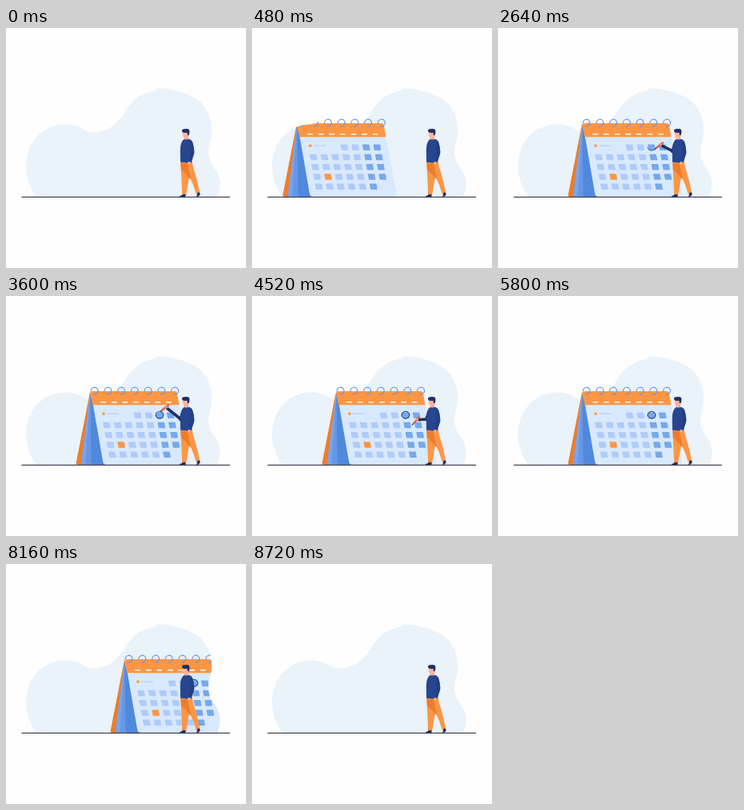
Animation, 300 px wide and 300 px high, one loop 9800 ms. Source, as an HTML page with a canvas:

```html
<!DOCTYPE html>
<html lang="en">
<head>
<meta charset="utf-8">
<title>Marking the date</title>
<style>
html, body { margin: 0; width: 100%; height: 100%; overflow: hidden; background: #fefefe; }
canvas { display: block; width: 100vw; height: 100vh; }
</style>
</head>
<body>
<canvas id="stage"></canvas>
<script>
const LOOP = 9800, STEP = 40;
const canvas = document.getElementById('stage');
const ctx = canvas.getContext('2d');

const color = {
  paper: '#fefefe', blob: '#eaf2fa', ground: '#45454f',
  orange: '#fc9645', rust: '#ee7d2b', sheet: '#d9e9fd',
  sky: '#76a5ee', blue: '#5088dd', day: '#aecbfa', weekend: '#76a8eb',
  ring: '#5b96ee', navy: '#202f63', shirt: '#27468f', skin: '#f8b59b', pen: '#e2633c'
};

const blobLeft = 'M38 211C27 196 23 178 26 163C30 138 49 121 73 120.5';
const blobRight = 'C180 73 216 75 237 88C254 99 260 120 256 138C252 154 252 160 257 170C265 182 272 192 264 211Z';
const blob = new Path2D(blobLeft + 'C94 120 98 131 109 130.5C128 130 140 119 149 105C157 92 167 81 188 78' + blobRight);
// The calendar shows only inside the backdrop, with the dip at the top filled in.
const sceneMask = new Path2D(blobLeft + 'L79 119L90 112L149 100L188 78' + blobRight);

const clamp = u => Math.max(0, Math.min(1, u));
const span = (t, a, b) => clamp((t - a) / (b - a));
const lerp = (a, b, u) => a + (b - a) * u;
const smooth = u => u * u * (3 - 2 * u);

function fill(path, c) {
  ctx.fillStyle = c;
  ctx.fill(typeof path === 'string' ? new Path2D(path) : path);
}

function stroke(path, c, w) {
  ctx.strokeStyle = c;
  ctx.lineWidth = w;
  ctx.stroke(typeof path === 'string' ? new Path2D(path) : path);
}

function oval(x, y, rx, ry, c) {
  const p = new Path2D();
  p.ellipse(x, y, rx, ry, 0, 0, Math.PI * 2);
  fill(p, c);
}

// Hand-drawn loop around the chosen day, traced twice from its left side.
const DRAW_FROM = 2360, DRAW_TO = 3800, LAPS = 2;
function loopPoint(lap) {
  const a = Math.PI * (1 - 2 * lap);
  const r = 1 - 0.04 * lap;
  return [192 + 5 * r * Math.cos(a), 148.7 + 4.5 * r * Math.sin(a)];
}

function drawMark(t) {
  const laps = LAPS * span(t, DRAW_FROM, DRAW_TO);
  if (!laps) return;
  const p = new Path2D();
  for (let i = 0; i <= 60; i++) p.lineTo(...loopPoint(laps * i / 60));
  stroke(p, '#2d4b87', 1);
}

function drawDays() {
  for (let row = 0; row < 5; row++) {
    for (let col = 0; col < 7; col++) {
      if ((row === 0 && col < 3) || (row === 4 && col === 6)) continue;
      const x = 124 + col * 13.65 + row * 2.25, y = 149.2 + row * 12.25;
      const c = row === 3 && col === 1 ? color.orange : col > 4 ? color.weekend : color.day;
      fill(`M${x - 4.6} ${y - 3.7}h7.4q.6 0 .7.6l1.1 6.2q.1.7-.6.7h-7q-.6 0-.8-.6l-1.3-6.2q-.1-.7.5-.7z`, c);
    }
  }
}

function drawCalendar(t) {
  const shift = t < 5800
    ? -225 * Math.pow(1 - span(t, 130, 1010), 3)
    : 185 * Math.pow(span(t, 7820, 8720), 1.5);
  if (t < 130 || t >= 8720) return;
  ctx.save();
  ctx.clip(sceneMask);
  ctx.translate(shift, 0);
  fill('M105 120L87.7 208.5Q87.5 211 90 211H99L109 130Z', color.rust);
  fill('M105.3 121L94 207Q94 211 97 211H124L109 130Z', color.sky);
  fill('M105.5 122L99.5 207Q99.5 211 103 211H124L109 130Z', '#6697e7');
  fill('M105.5 122L106.5 207Q107 211 110 211H125Q122 211 121 206L109 134Z', color.blue);
  fill('M108.5 134H216L229.8 207Q230.4 211 227 211H125.5Q122 211 121.2 207Z', color.sheet);
  fill('M105 122Q105.3 119 108.5 119H211Q213.3 119 213.8 121L216.5 136.3H108.5Z', color.orange);
  for (let i = 0; i < 7; i++) {
    const dash = 118.5 + i * 13.6;
    stroke(`M${dash} 132.7h6.4`, '#fff', 1.5);
    const ring = new Path2D();
    ring.arc(110.6 + i * 16.75, 118.6, 4.4, -Math.PI * 1.05, Math.PI * 0.62);
    stroke(ring, color.ring, 1.2);
  }
  oval(122, 147.1, 1.9, 1.9, color.orange);
  stroke('M126 147.1H141', '#bcd6fa', 1.5);
  drawDays();
  drawMark(t);
  ctx.restore();
}

// Pen tip: time, x, y, angle of the shaft in degrees.
const start = loopPoint(0), end = loopPoint(LAPS);
const penKeys = [
  [960, 224, 172, -90],
  [1120, 215.5, 173, -90],
  [1880, ...start, -38],
  [DRAW_FROM, ...start, -38],
  [DRAW_TO, ...end, -38],
  [4520, 200, 161.5, -48],
  [5320, 214, 172, -80],
  [5800, 224, 172, -90]
];

function penPose(t) {
  const next = penKeys.findIndex(k => k[0] > t);
  const a = penKeys[next - 1], b = penKeys[next];
  const u = smooth(span(t, a[0], b[0]));
  const pose = [1, 2, 3].map(i => lerp(a[i], b[i], u));
  if (t > DRAW_FROM && t < DRAW_TO) {
    [pose[0], pose[1]] = loopPoint(LAPS * span(t, DRAW_FROM, DRAW_TO));
  }
  return pose;
}

function drawArm(t) {
  if (t <= 960 || t >= 5800) return;
  const [x, y, deg] = penPose(t);
  const dx = Math.cos(deg * Math.PI / 180), dy = Math.sin(deg * Math.PI / 180);
  const hx = x + dx * 9, hy = y + dy * 9;
  const reach = clamp((222 - hx) / 16);
  const ex = lerp(222, 218.5, reach), ey = lerp(157, 154, reach);
  const len = Math.hypot(ex - hx, ey - hy) || 1;
  const cx = hx + (ex - hx) / len * 2, cy = hy + (ey - hy) / len * 2;
  ctx.lineCap = ctx.lineJoin = 'round';
  stroke(`M222 145L${ex} ${ey}L${cx} ${cy}`, color.navy, 3.6);
  stroke(`M222 145L${ex} ${ey}`, color.navy, 5);
  oval(hx, hy, 1.9, 1.7, color.skin);
  ctx.lineCap = 'butt';
  stroke(`M${x + dx * 2} ${y + dy * 2}L${x + dx * 14} ${y + dy * 14}`, color.pen, 2.5);
  stroke(`M${x} ${y}L${x + dx * 2.5} ${y + dy * 2.5}`, color.navy, 1.1);
  oval(hx + dx, hy + dy + 0.6, 1.2, 1.1, color.skin);
}

function drawMan() {
  fill('M220.8 206L225 207L224.3 211H216.8Q217 209.4 220 209Z', color.navy);
  fill('M238.6 206.5L241.3 204.6L242.8 207.4Q241.7 210.7 238.5 211Q237.4 210.6 238.9 209Z', color.navy);
  fill('M224 166H232.5Q233.5 174 236.5 182Q239.8 193 242 204.8L237.6 207.2Q235 197 230.5 188Q226 179 224 166Z', color.orange);
  fill('M218.2 166H231Q231.4 177 229 187Q227 198 225.3 208H220.2Q219.4 189 218.2 166Z', color.orange);
  fill('M218.3 168L227 170Q229 180 231.2 189L228.8 187.5Q223 180 218.8 177Z', color.rust);
  fill('M223 134H228V140.5Q225 142 222.8 140Z', '#f2a58b');
  fill('M221 129.5H228.2V134.5Q227 138.3 223.8 138.2Q221.6 138 221.3 134.5L220.7 133Z', color.skin);
  fill('M220 127.2Q222 125.7 228 126.2Q230 127.5 229.4 131L228.4 134.2H227.2L226.3 130.8Q222.5 131.5 220.3 130Z', color.navy);
  fill('M222.5 139Q226 140.2 229 138.8Q233.2 140.4 233.9 145Q235.8 153 233.5 160L231.8 168Q224 169 218 167.6L217.8 153Q217.6 142.5 222.5 139Z', color.shirt);
  fill('M231.3 166L228.2 166Q227.1 168.8 227.8 170.7L229.7 170.4Z', color.skin);
  fill('M230 141Q234 143 234.8 150Q236 155 234.9 158.2L231.6 168L228 166.8L230.7 156.5Z', '#243f82');
}

function drawScene(t) {
  const sx = canvas.width / 300, sy = canvas.height / 300;
  ctx.setTransform(sx, 0, 0, sy, 0, 0);
  ctx.fillStyle = color.paper;
  ctx.fillRect(0, 0, 300, 300);
  ctx.lineCap = 'butt';
  fill(blob, color.blob);
  drawCalendar(t);
  stroke('M19.5 211.4H280', color.ground, 1.1);
  drawArm(t);
  drawMan();
}

function resize() {
  const dpr = window.devicePixelRatio || 1;
  canvas.width = Math.round(innerWidth * dpr);
  canvas.height = Math.round(innerHeight * dpr);
}

const began = performance.now();
function tick() {
  const t = (performance.now() - began) % LOOP;
  drawScene(Math.floor(t / STEP) * STEP);
  requestAnimationFrame(tick);
}

addEventListener('resize', resize);
resize();
tick();
</script>
</body>
</html>
```
